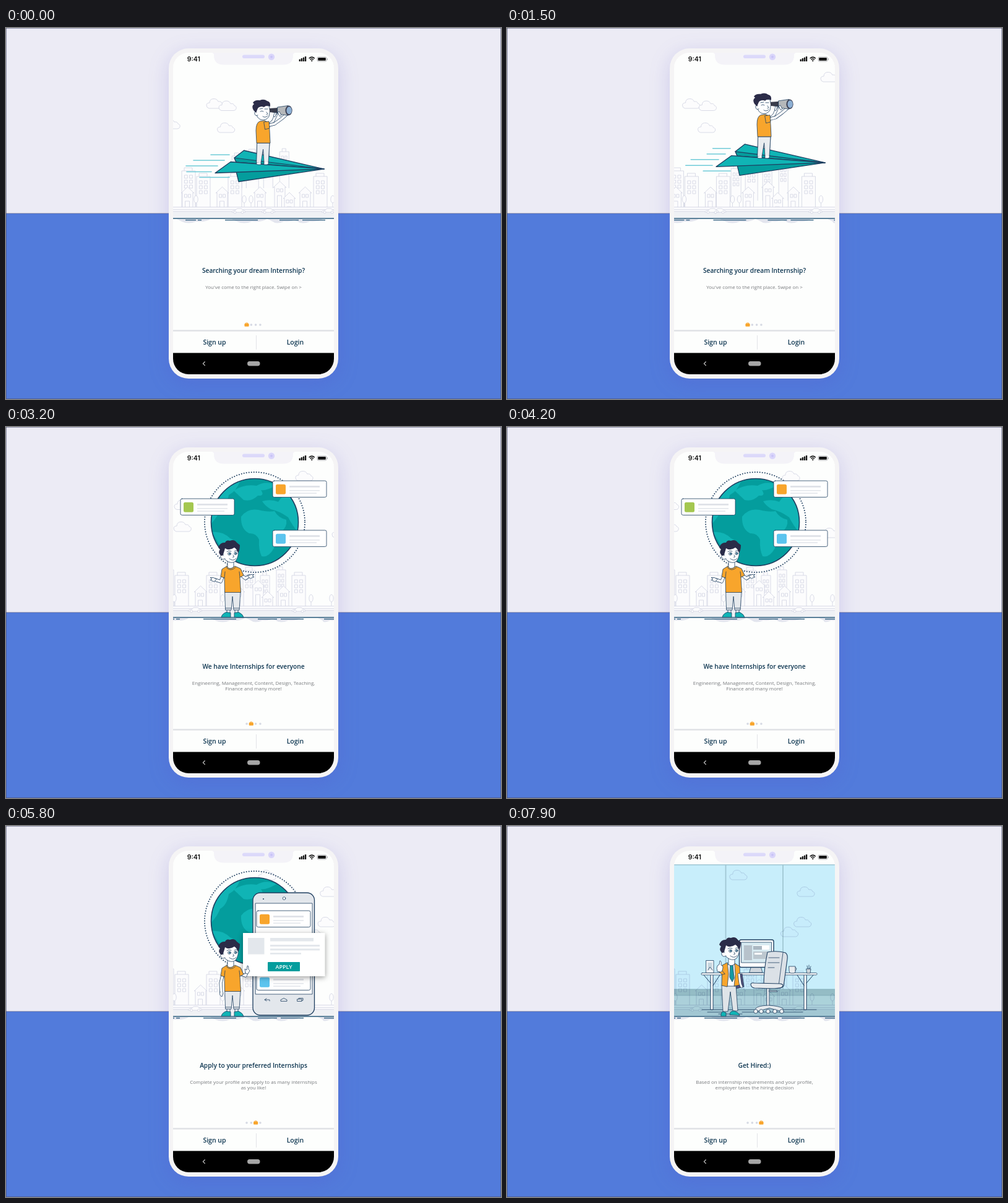
Animation of 800x600 px, one loop 8000 ms. Source, as an HTML page:

```html
<!DOCTYPE html>
<html lang="en">
<head>
<meta charset="utf-8">
<title>Internship onboarding</title>
<style>
html, body { margin: 0; width: 100%; height: 100%; overflow: hidden; background: #ecebf5; }
svg { display: block; width: 800px; height: 600px; }
text { font-family: "Open Sans", "Noto Sans", sans-serif; text-anchor: middle; }
.h { font-size: 10.2px; font-weight: 600; fill: #0d3550; }
.s { font-size: 7.95px; fill: #77797d; }
.line { fill: #fcfcfd; stroke: #d5d7e5; stroke-width: .9; stroke-linejoin: round; }
.ink { stroke: #1f3f60; stroke-width: .8; stroke-linejoin: round; stroke-linecap: round; }
</style>
</head>
<body>
<svg id="stage" viewBox="0 0 800 600"></svg>
<script>
const LOOP = 8000, STEP = 100, PAGE = 261;
const NAVY = '#1f3f60', TEAL = '#10b4b5', DEEP = '#049d9d', ORANGE = '#f8a52c', GREY = '#e3e7ec';

const path = (d, fill = 'none', extra = '') => `<path d="${d}" fill="${fill}" ${extra}/>`;
const ink = (d, fill = 'none', w = .8) => path(d, fill, `class="ink" style="stroke-width:${w}"`);
const rect = (x, y, w, h, fill, extra = '') =>
  `<rect x="${x}" y="${y}" width="${w}" height="${h}" fill="${fill}" ${extra}/>`;
const disc = (x, y, r, fill, extra = '') => `<circle cx="${x}" cy="${y}" r="${r}" fill="${fill}" ${extra}/>`;
const oval = (x, y, rx, ry, fill, extra = '') =>
  `<ellipse cx="${x}" cy="${y}" rx="${rx}" ry="${ry}" fill="${fill}" ${extra}/>`;
const group = (id, body, extra = '') => `<g id="${id}" ${extra}>${body}</g>`;
const text = (x, y, cls, str, extra = '') => `<text x="${x}" y="${y}" class="${cls}" ${extra}>${str}</text>`;
const limb = (d, w = 4.4) =>
  path(d, 'none', `stroke="${NAVY}" stroke-width="${w + 1.4}" stroke-linecap="round" stroke-linejoin="round"`) +
  path(d, 'none', `stroke="#fff" stroke-width="${w}" stroke-linecap="round" stroke-linejoin="round"`);

// City
function tower(x, y, w) {
  let s = `<path class="line" d="M${x} 290V${y}H${x + w}V290M${x + 4} ${y}V${y - 5}H${x + w - 5}V${y}"/>`;
  for (let r = 0; r < 3; r++)
    for (const c of [.2, .57])
      s += `<rect class="line" x="${x + w * c}" y="${y + 7 + r * 8}" width="${w * .22}" height="5"/>`;
  return s;
}
function house(x, y, w) {
  const m = x + w / 2;
  return `<path class="line" d="M${x + 2} 290V${y + 9}L${x} ${y + 10}L${m} ${y}L${x + w} ${y + 10}L${x + w - 2} ${y + 9}V290"/>` +
    `<path class="line" d="M${m - 5} ${y + 12}h4v5h-4zM${m + 1} ${y + 12}h4v5h-4zM${m - 4} 290V${y + 23}h7V290"/>`;
}
const tree = x => `<path class="line" d="M${x} 289V276"/><ellipse class="line" cx="${x}" cy="277" rx="3.2" ry="6"/>`;
const car = id => `<g id="${id}"><path class="line" d="M-11 298Q-11 295-6 295L-2 292H4L8 295Q11 295 11 298Z"/>
  <circle class="line" cx="-6" cy="298" r="2"/><circle class="line" cx="6" cy="298" r="2"/></g>`;

const rear = tower(360, 238, 16) + tower(383, 232, 20) + tower(437, 231, 15) + tower(411, 240, 15);
const front = [249, 273, 324, 462, 562].map((x, i) => tower(x, i ? 240 : 231, 22)).join('') +
  [248, 304, 365, 438, 536].map(x => house(x, 257, 21)).join('') +
  house(397, 248, 21) + house(413, 266, 20) +
  [272, 350, 361, 493, 526].map(tree).join('');
const road = rect(200, 290, 440, 17, '#fbfbfd') + rect(200, 297, 440, 10, '#eff1f5') +
  path('M200 289.7H640M200 293.7H640M200 296.7H640', 'none', 'stroke="#d5d7e5" stroke-width=".9"');
const soil = [[268, 27], [358, 28], [410, 22], [452, 24], [520, 16]]
    .map(([x, r]) => path(`M${x - r} 309H${x + r}Q${x + r - 5} 314 ${x + 4} 313Q${x - 8} 318 ${x - r + 8} 313Z`, '#e3e5ee')).join('') +
  path('M255 310.6H272M275 310.6H281M319 310.6H372M407 310.6H438M444 310.6H481M514 310.6H560', 'none',
    'stroke="#245679" stroke-width="1.3"');

const CLOUD = 'M4 16Q0 15 0 11Q0 7 5 7Q5 1 11 .5Q17 0 19 5Q24 4 25 8Q29 9 28 13Q27 16 24 16Z';
// start x, y, pixels per second
const clouds = [[253, 147, 22], [324, 114, 27], [344, 117.5, 22.5], [341.5, 153, 22],
  [541.5, 71, 23], [584.6, 163, 18], [615, 98, 18.5], [616, 147, 19.3]];

// Paper plane and its pilot
const plane =
  ink('M405 214L406 186H426L424 220H417L415.6 196L412 220H405Z', '#e9ecef') +
  ink('M369 210L384.5 198L514 228L372 217Z', TEAL, 1.3) +
  ink('M369 210L514 228L372 217Z', DEEP, 1.2) +
  ink('M372 232L376 248.5L514 228Z', DEEP, 1.3) +
  ink('M338 234.5L363 216.5L514 228Z', TEAL, 1.3) +
  ink('M406 186H426L424 218H417L415.6 196L412 218H405Z', '#e9ecef') +
  ink('M405 218Q404 221 408 221H412V217M417 217V221H422Q425 220 424 217', '#fff') +
  limb('M413 157L423 160L432 150L436 141', 3.6) +
  ink('M410 151Q404 153 404 166L405 186H427L426 166L425 153L418 150Z', ORANGE) +
  limb('M422 158L434 155L445 147L452 141', 3.8) +
  ink('M417 152L425 151L426 162L419 164Z', ORANGE) +
  ink('M404 130Q402 143 411 148Q420 151 425 143Q428 134 425 126Q414 124 404 130Z', '#fff') +
  ink('M405 136Q401 133 402 139Q403 143 407 141', '#fff') +
  path('M400 133Q396 126 401 123L399 121Q402 116 410 117Q417 114 422 118Q428 119 427 127Q421 124 417 128Q410 125 407 130L404 137Z', '#2b2c48') +
  ink('M410 131L415 130M411 135Q413 133 416 135M418 131L423 131M415 143Q419 146 423 142M421 136L423 139L421 140') +
  path('M426 130L440 129V138L426 136Z', '#393c4b') +
  ink('M439 128L456 125.5V141.5L439 139Z', '#b5b8ba') +
  oval(457, 133.4, 5.6, 7.8, '#3c4054') + oval(457.6, 133.4, 4.2, 6.2, '#8db0d4') +
  limb('M443 141L441 137', 2.4) + limb('M434 142L435 138', 2.2);

// right end, left end at the three keys below, y
const WIND_KEYS = [0, 900, 2200];
const wind = [[361, 331, 334, 331, 205], [353, 303, 320, 327, 214], [342, 291, 288, 308, 223],
  [332, 292, 292, 285, 232.5], [361, 313, 313, 322, 241.5]];

// Standing figure
const head =
  ink('M358 214V227Q363 231 368 226V216Z', '#fff') +
  ink('M351 197Q349 211 356 216Q364 222 371 217Q377 209 375 196Q362 190 351 197Z', '#fff') +
  ink('M351 207Q346 205 347 211Q349 216 354 213', '#fff') +
  path('M347 208Q342 202 346 198L343 195Q346 186 354 187Q356 182 362 184Q369 181 373 187L378 191Q378 199 375 204Q373 197 369 195Q360 201 354 196Q352 204 350 208Z', '#2b2c48') +
  oval(361, 205, 2.5, 2.2, '#fff', 'class="ink"') + oval(371, 204.5, 2.2, 2.1, '#fff', 'class="ink"') +
  disc(361.4, 205, 1.4, '#2d6685') + disc(371.2, 204.5, 1.3, '#2d6685') +
  ink('M357 201.5Q360 199 364 201M369 201Q371 199 374 200.5M367 207L368.5 210L366.5 210.6M361 213Q367 218 372 212.5');
const legs = ink('M357 293V301M362 293V301M370 293V301M375 293V301') +
  ink('M354 266H379L377 296H368L366 274L364 296H355Z', '#e6e9ed') + ink('M355 293H364M368 293H377') +
  ink('M348 307.5Q349 302 356 299.5L363 300.5V307.5Z', TEAL) +
  ink('M369 307.5V300.5L376 299.5Q383 303 384 307.5Z', TEAL);
const shirt = ink('M357 225L349 230L347 242L353 244L353.5 267.5H379.5L378 243L384 240L379 229L370 225Q363 232 357 225Z', ORANGE) +
  ink('M356 227Q363 235 371 227M353 244L354 234M378 243L377 234');
const hand = (x, y, k) => ink(`M${x} ${y}l${-5 * k} -2.5l${-5 * k} 0l${3 * k} 2.5l${-3 * k} 1.5l${6 * k} 2.5z`, '#fff');
const openArms = limb('M350 242L347 250L338 247', 3.8) + hand(340, 246, 1) +
  limb('M381 240L387 245L393 241', 3.8) + hand(391, 241, -1);
const pointArms = limb('M350 242L347 254L348 270', 3.8) + ink('M346 268Q344 274 349 276L351 270', '#fff') +
  limb('M381 240L387 242L390 235', 3.8) + ink('M387 238L386 231L389 233L390 226Q392 225 392 232L394 234L391 239Z', '#fff');
const figure = arms => legs + arms + shirt + head;

const suited =
  ink('M347 258L349 300H357L361 268L365 299H373L370 258Z', '#dfe4e8') +
  ink('M346 307.5Q345 302 349 300L354 302V307.5Z', TEAL) +
  ink('M360 305Q360 299 367 299Q375 302 376 306Z', TEAL) +
  ink('M369 241L380 239L383 260L371 263Z', '#514f78') +
  ink('M354 224H371L369 259H356Z', '#fff') +
  ink('M361 224H365L367 246L364 252L360 245Z', '#139aa3') +
  ink('M356 221L348 225L347 258L356 260L358 240Z', ORANGE) +
  ink('M368 222L376 227L377 257L367 259L369 240Z', ORANGE) +
  limb('M375 240L377 255L379 260', 3) + ink('M347 240L341 234L346 232L352 239Z', ORANGE) +
  ink('M340 235Q338 230 340 226L343 224L344 218Q347 218 346 225L349 227Q349 234 346 236Z', '#fff') +
  `<g transform="translate(0 -3)">${head}</g>`;

// Globe
const globe = disc(402, 154, 70.5, DEEP) +
  `<g clip-path="url(#ball)" fill="${TEAL}">
    <path d="M328 146Q340 98 378 88Q372 104 360 110Q357 128 346 134Q342 146 328 160Z"/>
    <path d="M368 103Q384 92 405 95Q420 86 437 94Q420 104 412 102Q419 112 407 111Q397 121 384 118Z"/>
    <path d="M380 145Q390 131 408 134Q424 138 434 136Q440 147 453 150Q455 162 444 170Q434 178 433 196Q424 212 413 209Q408 198 409 182Q404 171 393 172Q379 165 380 145Z"/>
    <path d="M414 120Q428 116 440 121Q446 110 460 108L480 140V180Q464 162 456 146Q442 136 428 133Q418 127 414 120Z"/>
    <path d="M333 170Q350 168 362 180Q378 186 376 204L360 216Z"/>
  </g>` +
  disc(402, 154, 70.5, 'none', `stroke="${NAVY}" stroke-width="1.6"`) +
  disc(402, 154, 81, 'none', `stroke="${NAVY}" stroke-width="2" stroke-linecap="round" stroke-dasharray="0 4.04"`);

// Listing cards: from x, y to x, y
const cards = [[431, 87, 405, 137, ORANGE], [282, 116, 405, 188, '#a4c750'], [431, 167, 405, 239, '#5cc4ee']];
const card = (c, i) => group('card' + i,
  rect(0, 0, 87, 26.5, '#fff', 'rx="2.5" class="ink"') + rect(5, 5.7, 16, 16, c[4], 'rx="2.5"') +
  rect(27, 8, 49, 2.8, '#dfe2e8') + rect(27, 15, 49, 1.6, '#e3e6eb') + rect(27, 19.3, 44, 1.6, '#e3e6eb'));

const handset = rect(399, 108, 99.5, 198, GREY, 'rx="12" class="ink" style="stroke-width:1.3"') +
  rect(403.5, 125, 91.5, 147, '#fff', 'class="ink"') +
  disc(449.5, 117, 2.3, '#fff', 'class="ink"') + disc(416, 118, 1, NAVY) +
  ink('M421 279L418 281L421 283M418 281H426V283M444 283V281L449 278.5L454 281V283ZM471 280H478V283.5H471ZM473 280V278.5H480V282H478');
const popup = rect(383, 173, 132.5, 70, '#fff', 'style="filter:drop-shadow(0 2px 4px #0006)"') +
  rect(391, 181, 26.5, 26.5, GREY) + rect(427, 181, 70, 5.5, GREY) + rect(427, 192, 80, 3, GREY) +
  rect(427, 198.3, 80, 3, GREY) + rect(427, 205, 50, 2.6, GREY) + rect(423, 220, 52, 15, DEEP, 'rx="1"') +
  text(449, 231, '', 'APPLY', 'font-size="9" font-weight="600" fill="#fff"');

// Office
const glass = rect(270, 62, 260, 202, '#caeffd') + rect(270, 264, 260, 10, '#95bdc7') + rect(270, 274, 260, 33.5, '#add3dc') +
  path('M353.5 62V264M446 62V264M270 62.5H530', 'none', 'stroke="#a2c8d6" stroke-width="1.8"') +
  path('M270 264H530M270 274H530', 'none', 'stroke="#7fa9b6" stroke-width=".8"');
const desk =
  ink('M315 297H400M430 297H500M324 301H348M380 301H478M342 304H380') +
  ink('M329 241V297H333V241M480 241V297H484V241M318 241L329 254M344 241L333 258M469 241L480 258M495 241L484 254', '#fff', 1) +
  ink('M395 227H410L413 237H392Z', '#cfd6dd') +
  rect(375.5, 184, 55.5, 44.5, '#fff', 'rx="3" class="ink" style="stroke-width:1.4"') +
  rect(379, 188, 48.5, 33, '#d7eaf1', 'class="ink"') +
  rect(383, 193, 13, 24, '#b7c2cb') + rect(398, 193, 26, 7, '#fff') + rect(398, 194, 14, 6, '#aab7c2') +
  rect(398, 203, 23, 12, '#bcc7cf') + rect(400, 205, 12, 3, '#fff') +
  rect(314, 237.6, 187, 3.3, '#fff', 'rx="1.5" class="ink"') +
  rect(322, 217.5, 12, 20, '#f2f5f7', 'class="ink"') + rect(324.5, 221, 7, 12, '#c7d6df') +
  ink('M325 233L328 228L332 233M456 227H466V236Q465 238 463 238H459Q456 238 456 235ZM466 229Q470 230 466 234', '#e8ecef') +
  ink('M484 231H491L490 238H485ZM486 231L485 226M488 231V225M489.5 231L491 227', '#cfd6db') +
  ink('M420 262H424V291H420Z', '#dfe4e9') +
  ink('M402 295Q404 291 422 290Q440 291 446 295V299H441L424 294.5L407 299H402Z', '#e6eaee') +
  [402, 411, 422, 433, 444].map(x => disc(x, 299.8, 3.3, '#eef1f3', 'class="ink"')).join('') +
  ink('M421 204Q436 201 450 205Q454 208 453 215L447 259Q444 263 436 262L415 256Q415 232 421 204Z', '#dbe1e7', 1.1) +
  ink('M446 205L439 258', 'none') + ink('M423 213H440M422 221H440M422 229H432') +
  ink('M394 256Q394 253 400 254L441 255Q449 256 444 261Q438 264 400 262Q394 261 394 256Z', '#e6eaee', 1.1) +
  ink('M424 266H436L437 268H424Z', '#cfd6dd');

// Captions
const pages = [
  ['Searching your dream Internship?', 396, 'You\'ve come to the right place. Swipe on &gt;'],
  ['We have Internships for everyone', 391.3, 'Engineering, Management, Content, Design, Teaching,', 'Finance and many more!'],
  ['Apply to your preferred Internships', 391.3, 'Complete your profile and apply to as many internships', 'as you like!'],
  ['Get Hired:)', 391.3, 'Based on internship requirements and your profile,', 'employer takes the hiring decision']];
const captions = pages.map(([title, y, ...lines], i) => {
  const x = 400 + i * PAGE;
  return text(x, y, 'h', title) + lines.map((l, n) => text(x, y + 25.6 + n * 8.8, 's', l)).join('');
}).join('');
const dots = [389, 396.3, 403.6, 410.9].map(x => disc(x, 480, 1.8, '#d5d8e3')).join('') +
  group('mark', rect(-3.6, -2, 7.2, 4.8, ORANGE, 'rx="1"') + path('M-1.6 -2V-3H1.6V-2', 'none', `stroke="${ORANGE}"`));

const bars = [3.5, 5, 6.5, 8].map((h, i) => rect(473.6 + i * 3.1, 54 - h, 2.3, h, '#111', 'rx=".6"')).join('');
const chrome =
  path('M270 40H530V62H270Z', '#fdfefd') +
  path('M332 40Q336 40 336 44Q336 59.5 352 59.5H448Q464 59.5 464 44Q464 40 468 40Z', '#f4f3f8') +
  text(303.3, 54.3, '', '9:41', 'style="font:600 10.5px Inter,sans-serif" fill="#111"') + bars +
  path('M489.6 49.2Q494.2 45 498.8 49.2M491.4 51.3Q494.2 48.8 497 51.3', 'none', 'stroke="#111" stroke-width="1.5"') +
  path('M492.6 52.6Q494.2 51.4 495.8 52.6L494.2 54.4Z', '#111') +
  rect(503, 46.8, 15, 7.2, 'none', 'rx="2" stroke="#9a9a9e" stroke-width=".7"') + rect(504.2, 48, 12.6, 4.8, '#111', 'rx="1"') +
  rect(518.7, 49.2, 1, 2.6, '#9a9a9e') +
  rect(270, 488.4, 260, 2.2, '#dddfe3') + rect(404, 497, 1, 23, '#e2e4e8') +
  text(337, 512, 'h', 'Sign up', 'style="font-size:10.5px"') + text(467.4, 512, 'h', 'Login', 'style="font-size:10.5px"') +
  rect(270, 525.5, 260, 35, '#000') + rect(390, 539, 20.5, 7.5, '#a6a6a6', 'rx="3.7"') +
  path('M321.6 539.5L318.4 542.8L321.6 546', 'none', 'stroke="#c9c9c9" stroke-width="1.1"');

const stage = document.getElementById('stage');
stage.innerHTML = `<defs>
    <clipPath id="screen"><rect x="270" y="40" width="260" height="520" rx="25"/></clipPath>
    <clipPath id="ball"><circle cx="402" cy="154" r="70.5"/></clipPath>
  </defs>` +
  rect(0, 0, 800, 300, '#ecebf5') + rect(0, 300, 800, 300, '#527bdb') +
  path('M.5 0V600M799.5 0V600M0 .5H800M0 299.8H800M0 599.5H800', 'none', 'stroke="#4a4e70" stroke-opacity=".55"') +
  rect(263, 33, 274, 534, '#f5f4f5', 'rx="32" style="filter:drop-shadow(0 8px 16px rgba(86,76,200,.2))"') +
  `<g clip-path="url(#screen)">` + rect(270, 40, 260, 520, '#fdfefd') +
  clouds.map((c, i) => `<path id="cloud${i}" class="line" d="${CLOUD}"/>`).join('') +
  group('rear', rear) + group('front', front) + road + car('carA') + car('carB') + car('carC') +
  group('soil', soil) + group('glass', glass, 'style="mix-blend-mode:multiply"') +
  path('M270 308H530', 'none', 'stroke="#245679" stroke-width="1.3"') +
  group('office', desk) + group('globe', globe) + group('handset', handset) +
  group('cards', cards.map(card).join('')) + group('popup', popup) +
  group('boyOpen', figure(openArms)) + group('boyPoint', figure(pointArms)) + group('boySuit', suited) +
  group('flight', wind.map((w, i) => `<path id="wind${i}" stroke="#6fcbd8" stroke-width="1.6" stroke-linecap="round"/>`).join('') + plane) +
  group('captions', captions) + dots + chrome + '</g>' +
  rect(382, 43.6, 36, 5.4, '#dcd9fa', 'rx="2.7"') + disc(429, 46.8, 5.2, '#d9d5fa') + disc(429, 46.8, 2, '#c9c3f6');

const el = {};
stage.querySelectorAll('[id]').forEach(n => el[n.id] = n);
const move = (id, x, y = 0, more = '') => el[id].setAttribute('transform', `translate(${x} ${y}) ${more}`);
const fade = (id, o) => { el[id].style.opacity = o; el[id].style.display = o > 0 ? '' : 'none'; };
const grow = (id, k, x, y) => move(id, x * (1 - k), y * (1 - k), `scale(${k})`);
const clamp = v => Math.min(1, Math.max(0, v));
const lerp = (a, b, k) => a + (b - a) * k;
const swipe = (t, start) => { const k = clamp((t - start) / 500); return k * k * (3 - 2 * k); };

function draw(t) {
  const sec = t / 1000;
  const a = swipe(t, 2450), b = swipe(t, 4960), c = swipe(t, 7250);
  const late = clamp(b * 2 - 1);

  clouds.forEach(([x, y, v], i) => move('cloud' + i, x - v * sec, y));
  const drift = Math.max(0, 35 - 13.7 * sec);
  move('front', drift);
  move('soil', drift);
  move('rear', drift * .15, -31 * clamp(1 - sec / 2.3));
  move('carA', 376 - 22 * Math.min(sec, 3.2));
  move('carB', 424 - 62 * sec);
  move('carC', Math.max(471, 521 - 15 * sec));

  const bob = 13.5 * (Math.cos(sec * 2 * Math.PI / 1.9) - 1);
  move('flight', 190 * a * a, bob - 30 * a);
  fade('flight', 1 - a);
  const n = t < WIND_KEYS[1] ? 0 : 1;
  const k = clamp((t - WIND_KEYS[n]) / (WIND_KEYS[n + 1] - WIND_KEYS[n]));
  wind.forEach((w, i) => el['wind' + i].setAttribute('d', `M${lerp(w[n + 1], w[n + 2], k)} ${w[4]}H${w[0]}`));

  fade('globe', a * (1 - c));
  grow('globe', .6 + .4 * a, 402, 154);
  fade('cards', a * (1 - c));
  cards.forEach(([x0, y0, x1, y1], i) => move('card' + i, lerp(x0, x1, b), lerp(y0, y1, b)));
  fade('handset', late * (1 - c));
  move('handset', 60 * (1 - late));
  fade('popup', late * (1 - c));
  grow('popup', .5 + .5 * late, 449, 208);

  fade('boyOpen', a * (1 - b));
  fade('boyPoint', b * (1 - c));
  fade('boySuit', c);
  fade('glass', c);
  fade('office', c);

  const page = a + b + c;
  move('captions', -PAGE * page);
  move('mark', 389 + 7.3 * page, 480);
}

const begin = performance.now();
function tick() {
  const t = (performance.now() - begin) % LOOP;
  draw(Math.floor(t / STEP) * STEP);
  requestAnimationFrame(tick);
}
draw(0);
requestAnimationFrame(tick);
</script>
</body>
</html>
```
